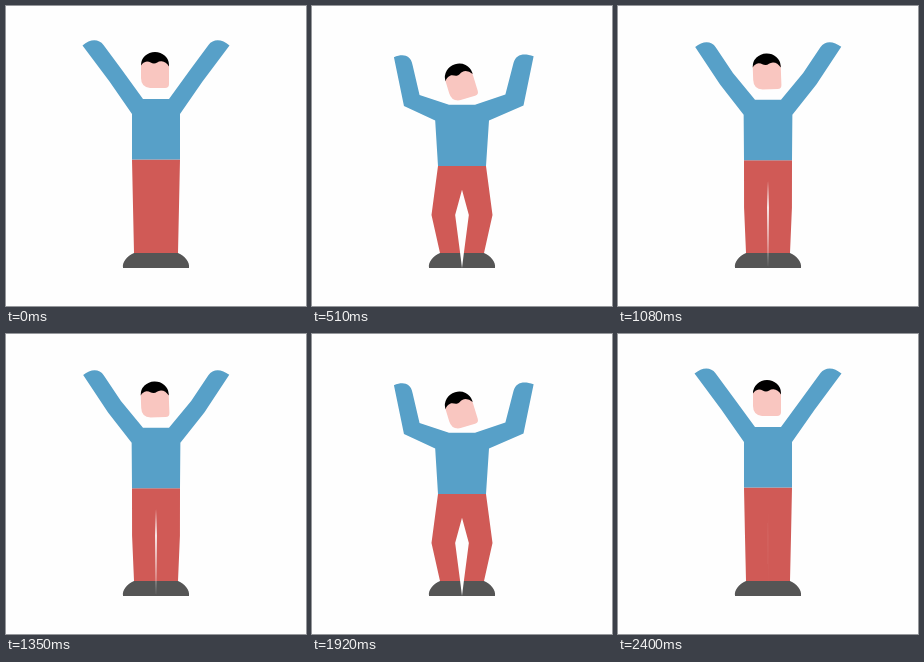
Write an HTML page that moves like this. It is 300 px wide and 300 px high and loops after 2430 ms.

```html
<!DOCTYPE html>
<html lang="en">
<head>
<meta charset="utf-8">
<title>Arm and knee bends</title>
<style>
  html, body { margin: 0; height: 100%; overflow: hidden; background: #fefefe; }
  svg { display: block; width: 100%; height: 100%; }
</style>
</head>
<body>
<svg viewBox="0 0 300 300">
  <g id="head">
    <path fill="#f9c6c0" d="M135 58Q149 48 163 58V78Q163 82 159 82H144Q135 81 135 72Z"/>
    <path d="M135 59.5V59A14 13 0 0 1 163 59V60.5Q160 55.5 155.5 55.2C152 55 150.5 57.5 148 57.5C145.500 57.500 144 55.500 141 55.500Q137 56 135 59.500Z"/>
  </g>
</svg>
<script>
const LOOP = 2430, STEP = 30, CYCLES = 2;
const svg = document.querySelector('svg');
const head = document.getElementById('head');

// "a~b" in a path means a + b * bend, where bend runs from 0 (straight) to 1.
const parts = [
  ['#555', `M117 262C116 256 121 250 128 247H150~-2L150 262Z
            M183 262C184 256 179 250 172 247H150~2L150 262Z`],
  ['#d05a56', `M126 153.5~7H174L173~8 200.5~9L172 247H150~2L150~7.3 200.5~9
               L150 173.5~11L150~-7.3 200.5~9L150~-2 247H128L127~-8 200.5~9Z`],
  ['#57a0c8', `M126 153.5~7L126~-3 108~6.8L103.5~-12.3 75.5~26L76.5~5.8 39.5~12.5
               C84~7.5 33~15.5 92.5~6.4 32.5~17.5 97.5~3.2 39~21
               L116~-9 64~26.6L137 93~6.2H163L184~10 64~26
               L202.5~-1 39~19C207.5~-3.5 32.5~16.5 216~-4.5 33~15 223.5~-2 39.5~11.5
               L196.5~16 75.5~25.5L174~3.2 108~6.8L174 153.5~7Z`]
].map(([fill, shape]) => {
  const path = document.createElementNS(svg.namespaceURI, 'path');
  path.setAttribute('fill', fill);
  svg.append(path);
  return { path, shape };
});

function pose(bend) {
  for (const { path, shape } of parts) {
    path.setAttribute('d', shape.replace(/([\d.]+)~(-?[\d.]+)/g,
      (_, start, change) => +start + change * bend));
  }
  head.setAttribute('transform',
    `translate(${-0.8 * bend} ${12.2 * bend}) rotate(${-18 * bend} 149 64)`);
}

function draw() {
  const time = Math.floor(performance.now() % LOOP / STEP) * STEP;
  pose((1 - Math.cos(2 * Math.PI * CYCLES * time / LOOP)) / 2);
  requestAnimationFrame(draw);
}
draw();
</script>
</body>
</html>
```
